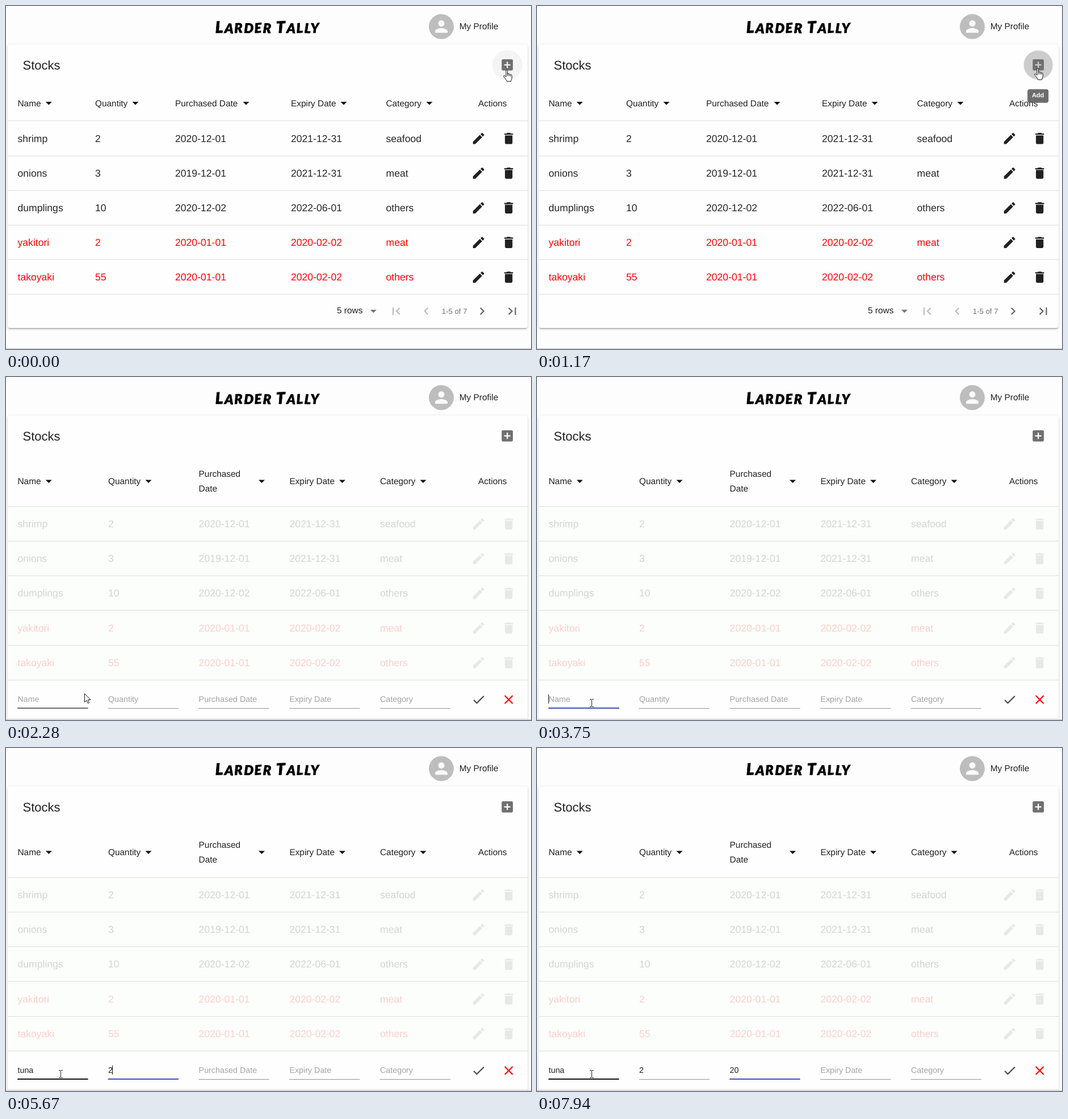
Animation, 925 px wide and 605 px high, one loop 8 s. Source, as an HTML page:

```html
<!DOCTYPE html>
<html lang="en">
<head>
<meta charset="utf-8">
<title>Larder Tally</title>
<style>
  html, body { margin: 0; width: 100%; height: 100%; overflow: hidden; background: #fdfdfd; }
  #frame { position: relative; width: 925px; height: 605px; max-height: 100%; overflow: hidden; contain: strict; }
  #paper {
    position: absolute; left: 3px; top: 68px; width: 916px; border-radius: 4px; background: #fefefe;
    box-shadow: 0 3.3px 1.1px -2.2px rgba(0,0,0,.2), 0 2.2px 2.2px rgba(0,0,0,.14), 0 1.1px 5.5px rgba(0,0,0,.12);
  }
  svg { position: absolute; left: 0; top: 0; display: block; }
  text { font-family: "Liberation Sans", Arial, sans-serif; fill: #212121; white-space: pre; text-rendering: geometricPrecision; }
  .title { font: italic 900 28px Lato, sans-serif; fill: #000; stroke: #000; stroke-width: .7; stroke-linejoin: round; letter-spacing: 2.1px; }
</style>
</head>
<body>
<div id="frame">
  <div id="paper"></div>
  <svg id="stage" width="925" height="605" viewBox="0 0 925 605"></svg>
</div>
<script>
const LOOP = 8000;
const stage = document.getElementById('stage');
const paper = document.getElementById('paper');

const ICONS = {
  edit: 'M3 17.25V21h3.75L17.81 9.94l-3.75-3.75L3 17.25zM20.71 7.04c.39-.39.39-1.02 0-1.41l-2.34-2.34c-.39-.39-1.02-.39-1.41 0l-1.83 1.83 3.75 3.75 1.83-1.83z',
  trash: 'M6 19c0 1.1.9 2 2 2h8c1.1 0 2-.9 2-2V7H6v12zM19 4h-3.5l-1-1h-5l-1 1H5v2h14V4z',
  add: 'M19 3H5c-1.11 0-2 .9-2 2v14c0 1.1.89 2 2 2h14c1.1 0 2-.9 2-2V5c0-1.1-.9-2-2-2zm-2 10h-4v4h-2v-4H7v-2h4V7h2v4h4v2z',
  check: 'M9 16.17L4.83 12l-1.42 1.41L9 19 21 7l-1.41-1.41z',
  clear: 'M19 6.41L17.59 5 12 10.59 6.41 5 5 6.41 10.59 12 5 17.59 6.41 19 12 13.41 17.59 19 19 17.59 13.41 12z',
  first: 'M18.41 16.59L13.82 12l4.59-4.59L17 6l-6 6 6 6zM6 6h2v12H6z',
  prev: 'M15.41 7.41L14 6l-6 6 6 6 1.41-1.41L10.83 12z',
  next: 'M10 6L8.59 7.41 13.17 12l-4.58 4.58L10 18l6-6z',
  last: 'M5.59 7.41L10.18 12l-4.59 4.59L7 18l6-6-6-6zM16 6h2v12h-2z',
  down: 'M7 10l5 5 5-5z',
  person: 'M12 12c2.21 0 4-1.79 4-4s-1.79-4-4-4-4 1.79-4 4 1.79 4 4 4zm0 2c-2.67 0-8 1.34-8 4v2h16v-2c0-2.66-5.33-4-8-4z'
};
const FIELDS = ['Name', 'Quantity', 'Purchased Date', 'Expiry Date', 'Category'];
const ROWS = [
  ['shrimp', '2', '2020-12-01', '2021-12-31', 'seafood'],
  ['onions', '3', '2019-12-01', '2021-12-31', 'meat'],
  ['dumplings', '10', '2020-12-02', '2022-06-01', 'others'],
  ['yakitori', '2', '2020-01-01', '2020-02-02', 'meat'],
  ['takoyaki', '55', '2020-01-01', '2020-02-02', 'others']
];
const PITCH = 61.15;
const FIELD_W = 124.3;

function el(parent, tag, attrs = {}) {
  const node = document.createElementNS('http://www.w3.org/2000/svg', tag);
  set(node, attrs);
  return parent.appendChild(node);
}
function set(node, attrs) {
  for (const k in attrs) node.setAttribute(k, attrs[k]);
}
// Baselines sit on whole pixels
function label(parent, x, y, size, str, attrs = {}) {
  const node = el(parent, 'text', { x, y: Math.round(y), 'font-size': size, ...attrs });
  node.textContent = str;
  return node;
}
function icon(parent, name, x, y, fill = '#212121', scale = 1.1) {
  return el(parent, 'path', { d: ICONS[name], fill, transform: `translate(${x} ${y}) scale(${scale}) translate(-12 -12)` });
}
function rule(parent, y) {
  el(parent, 'rect', { x: 3, y, width: 916, height: 1, fill: '#dedede' });
}
const show = (node, on) => node.setAttribute('display', on ? 'inline' : 'none');
const clamp = v => Math.max(0, Math.min(1, v));

// cubic-bezier(.4, 0, .2, 1)
function ease(v) {
  const x = clamp(v);
  let lo = 0, hi = 1, s = x;
  for (let i = 0; i < 18; i++) {
    s = (lo + hi) / 2;
    const bx = 1.2 * (1 - s) * (1 - s) * s + .6 * (1 - s) * s * s + s * s * s;
    if (bx < x) lo = s; else hi = s;
  }
  return 3 * (1 - s) * s * s + s * s * s;
}

function buildTable(xs, arrows, top, headY, editing) {
  const g = el(stage, 'g');
  FIELDS.forEach((name, i) => {
    if (editing && i === 2) {
      label(g, xs[i], headY - 13.4, 15.4, 'Purchased');
      label(g, xs[i], headY + 13, 15.4, 'Date');
    } else label(g, xs[i], headY, 15.4, name);
    icon(g, 'down', arrows[i], headY - 5.5, '#111');
  });
  label(g, 832, headY, 15.4, 'Actions');
  if (editing) el(g, 'rect', { x: 3, y: top, width: 916, height: PITCH * 5, fill: '#fcfefb' });
  const body = el(g, 'g', { opacity: editing ? .19 : 1 });
  ROWS.forEach((row, r) => {
    const y = top + r * PITCH;
    const style = r > 2 ? 'fill:#ff0000' : 'fill:#262626';
    row.forEach((cell, i) => label(body, xs[i], y + 36.6, 17.6, cell, { style }));
    const fade = el(body, 'g', { opacity: editing ? .5 : 1 });
    icon(fade, 'edit', 832.6, y + 30.7);
    icon(fade, 'trash', 885.7, y + 30.7);
  });
  for (let r = 0; r < 6; r++) rule(g, Math.floor(top + r * PITCH - .1));
  return g;
}

// Page header
const title = el(stage, 'text', { class: 'title', x: 461.5, y: 47.5, 'text-anchor': 'middle', rotate: '-2 3 -2 1 -3 2 0 -2 2 -3 2 -2' });
[['L', 28], ['ARDER', 23.5], [' T', 28], ['ALLY', 23.5]].forEach(([str, size]) => {
  el(title, 'tspan', { style: `font-size:${size}px` }).textContent = str;
});
el(stage, 'circle', { cx: 767, cy: 36.3, r: 22, fill: '#bdbdbd' });
icon(stage, 'person', 767, 36.3, '#fafafa', 1.375);
label(stage, 798.8, 41.4, 15.4, 'My Profile');
label(stage, 29.5, 111.6, 22, 'Stocks');

// Add button
const hover = el(stage, 'circle', { cx: 883.2, cy: 104, r: 26.5 });
const ripple = el(stage, 'circle', { cx: 883.2, cy: 104 });
icon(stage, 'add', 883.2, 103.8, '#707070');

// Plain table with pagination
const listX = [20.5, 157, 298, 502, 669.5];
const listView = buildTable(listX, [75.3, 228, 423, 595, 746], 203, 176.6, false);
label(listView, 583, 542, 15.4, '5 rows');
icon(listView, 'down', 647.3, 538, '#757575');
icon(listView, 'first', 687.5, 538.3, '#bdbdbd');
icon(listView, 'prev', 740.5, 538.3, '#bdbdbd');
label(listView, 767.8, 542.8, 13.2, '1-5 of 7', { style: 'fill:#757575' });
icon(listView, 'next', 838.8, 538.3, '#666');
icon(listView, 'last', 892, 538.3, '#666');

// Table with the entry row
const editX = [20.5, 180, 339.6, 499.4, 659];
const editView = buildTable(editX, [75.3, 251, 450.5, 592.5, 735], 228.5, 189.2, true);
rule(editView, 602);
const inputs = FIELDS.map((name, i) => {
  const x = editX[i] - .3;
  el(editView, 'rect', { x, y: 584, width: FIELD_W, height: 1, fill: '#949494' });
  return {
    x,
    hint: label(editView, editX[i], 573, 14.3, name, { style: 'fill:#a3a3a3' }),
    value: label(editView, editX[i], 573, 14.3, ''),
    hover: el(editView, 'rect', { x, y: 583, width: FIELD_W, height: 2, fill: '#111', opacity: 0 }),
    focus: el(editView, 'rect', { y: 583, height: 2, fill: '#3f51b5' })
  };
});
const caret = el(editView, 'rect', { y: 560, width: 1, height: 16, fill: '#111' });
icon(editView, 'check', 832.8, 569, '#4d4d4d');
icon(editView, 'clear', 885.7, 569, '#ff0000');

el(stage, 'rect', { x: 0, y: 604, width: 925, height: 1, fill: '#c2c2c2' });

const tip = el(stage, 'g');
el(tip, 'rect', { x: 864.2, y: 146.8, width: 37, height: 24, rx: 4, fill: '#616161', opacity: .92 });
label(tip, 882.6, 161.2, 11, 'Add', { 'font-weight': 700, 'text-anchor': 'middle', style: 'fill:#fff' });

// Pointers
const pen = { fill: '#fff', stroke: '#111', 'stroke-width': 1, 'stroke-linejoin': 'round' };
const hand = el(stage, 'g', pen);
el(hand, 'path', { d: 'M5 2.2Q5 .6 6.3 .6Q7.6 .6 7.6 2.2V8Q7.7 6.8 9 7Q10.2 7.2 10.2 8.6Q10.5 7.6 11.6 7.9Q12.8 8.2 12.8 9.6Q13.2 8.8 14.2 9.1Q15.3 9.5 15.3 11V15Q15.3 17 13.8 19.5V21H6.3V19.5Q4.5 17.5 2.5 14.5Q.2 11.6 1 11Q2.2 10 3.6 11.6L5 13Z' });
el(hand, 'path', { d: 'M7.6 8V11.5M10.2 8.6V11.8M12.8 9.6V12', fill: 'none' });
const arrow = el(stage, 'path', { d: 'M.5 .5V15.5L4 12.3L6.3 17.6L8.6 16.6L6.3 11.5H11Z', ...pen });
const beam = el(stage, 'path', { d: 'M-3-6.5H0M1-6.5H4M.5-6V6M-3 6.5H0M1 6.5H4', fill: 'none', stroke: '#222' });

// Keystrokes: [time, field, text]
const KEYS = [
  [4120, 0, 't'], [4200, 0, 'tu'], [4430, 0, 'tun'], [4510, 0, 'tuna'],
  [5670, 1, '2'], [7160, 2, '2'], [7390, 2, '20']
];
const FOCUS = [[2740, 4920], [4920, 6470], [6470, 9000]];
const BLINKS = [[3280, 3750], [5450, 5670], [6220, 6470], [7000, 7160], [7940, 8000]];
// Pointer path: [time, x, y]
const PATH = [[0, 876, 112], [70, 876, 112], [310, 876, 109], [1440, 876, 109], [1550, 836, 104], [1720, 800, 122],
  [1960, 520, 330], [2280, 138, 558], [2440, 100, 575], [2560, 100, 575], [2570, 96, 575]];

function pointerAt(t) {
  let i = 0;
  while (i < PATH.length - 2 && t >= PATH[i + 1][0]) i++;
  const [t0, x0, y0] = PATH[i], [t1, x1, y1] = PATH[i + 1];
  const k = clamp((t - t0) / (t1 - t0));
  return [Math.round(x0 + (x1 - x0) * k), Math.round(y0 + (y1 - y0) * k)];
}

function render(t) {
  const editing = t >= 1240;
  show(listView, !editing);
  show(editView, editing);
  paper.style.height = (editing ? 560 : 500) + 'px';

  hover.setAttribute('opacity', .04 * (1 - clamp((t - 1420) / 120)));
  const rt = t < 780 ? 0 : t < 930 ? 780 : t;
  set(ripple, {
    r: 26.5 * (t < 930 && rt ? .3 : ease((rt - 760) / 550)),
    opacity: t > 1550 ? 0 : .165 * (1 - ease((t - 1130) / 550))
  });

  const shown = ease((t - 210) / 220) - ease((t - 1700) / 200);
  const s = .75 + .25 * shown;
  set(tip, { opacity: shown, transform: `translate(882.5 146.5) scale(${s}) translate(-882.5 -146.5)` });

  // The pointer is refreshed in coarse steps while it travels
  const pt = t < 1550 || t >= 2520 ? t : t < 1720 ? 1550 : 1720 + Math.floor((t - 1720) / 80) * 80;
  const move = `translate(${pointerAt(pt).join(' ')})`;
  [hand, arrow, beam].forEach(p => p.setAttribute('transform', move));
  show(hand, t < 1480);
  show(arrow, t >= 1480 && t < 2360);
  show(beam, t >= 2360);

  const values = ['', '', '', '', ''];
  for (const [at, i, str] of KEYS) if (t >= at) values[i] = str;
  inputs.forEach((f, i) => {
    f.value.textContent = values[i];
    show(f.hint, !values[i]);
    const [on, off] = FOCUS[i] || [9000, 9000];
    const w = FIELD_W * (ease((t - on + 40) / 220) - ease((t - off + 40) / 220));
    set(f.focus, { x: f.x + (FIELD_W - w) / 2, width: w });
  });
  inputs[0].hover.setAttribute('opacity', clamp((t - 2180) / 200));

  const active = FOCUS.findIndex(([on, off]) => t >= on && t < off);
  show(caret, active >= 0 && !BLINKS.some(([a, b]) => t >= a && t < b));
  if (active >= 0) {
    const text = inputs[active].value;
    const w = values[active] ? text.getComputedTextLength() : 0;
    caret.setAttribute('x', Math.floor(editX[active] + w + (active === 2 && !w ? .5 : 0)));
  }
}

const start = performance.now();
function tick() {
  render((performance.now() - start) % LOOP);
  requestAnimationFrame(tick);
}
tick();
</script>
</body>
</html>
```
